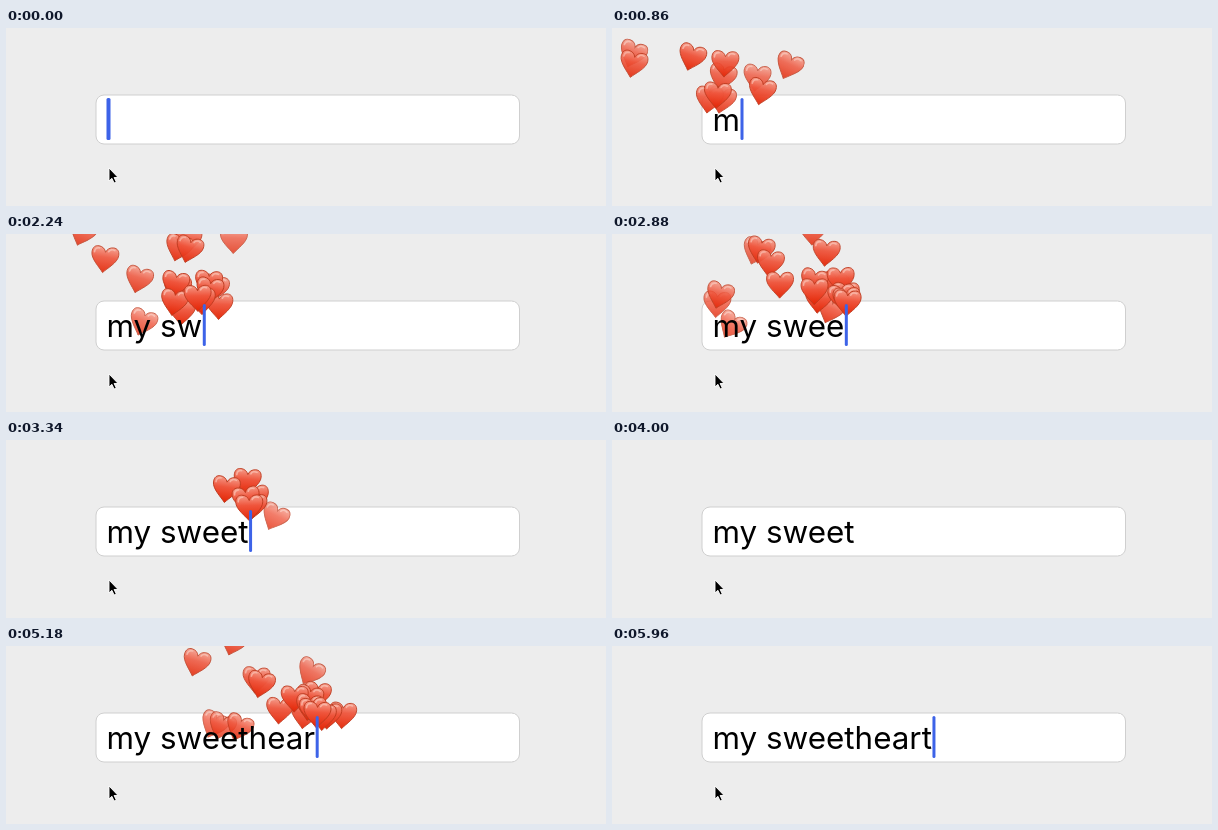
These frames come from a looping animation (600x178 px, 5980 ms). An HTML page:

```html
<!DOCTYPE html>
<html lang="en">
<head>
<meta charset="utf-8">
<title>Hearts while typing</title>
<style>
  html, body { margin: 0; width: 100%; height: 100%; overflow: hidden; background: #ededed; }
  svg { display: block; width: 600px; height: 178px; }
  text { font: 31.4px Inter, "Liberation Sans", sans-serif; white-space: pre; }
</style>
</head>
<body>
<svg viewBox="0 0 600 178">
  <defs>
    <linearGradient id="gloss" x1="0" y1="0" x2="0" y2="1">
      <stop offset="0" stop-color="#f69c8a"/>
      <stop offset=".4" stop-color="#ef553c"/>
      <stop offset="1" stop-color="#e32404"/>
    </linearGradient>
    <g id="heart">
      <path d="M0 13C-4 8-13.5 1-13.5-6C-13.5-11-11-13-7.5-13C-4-13-1-11 0-7.5C1-11 4-13 7.5-13C11-13 13.5-11 13.5-6C13.5 1 4 8 0 13Z"
            fill="url(#gloss)" stroke="#bd3a1e" stroke-width=".9"/>
      <path d="M-11-6.5C-11-10-9-11-6.5-11M3-8.5C4-11 6.5-11.5 9-10.5" fill="none"
            stroke="#fbc4b6" stroke-width="1.6" stroke-linecap="round" opacity=".7"/>
    </g>
  </defs>
  <rect width="600" height="178" fill="#ededed"/>
  <rect x="90" y="67" width="423.5" height="49" rx="8" fill="#fff" stroke="#cfcfcf"/>
  <g id="hearts"></g>
  <text id="typed" x="100.5" y="103" xml:space="preserve"></text>
  <rect id="caret" y="70" height="42" rx="1.5" fill="#3d63e8"/>
  <path d="M103 140V153L105.9 150.3L108.1 155L110.3 154L108.1 149.5H112.1Z"
        stroke="#fff" stroke-width=".9"/>
</svg>
<script>
const LOOP = 5980, STEP = 302, BLINK = 760;
const HEARTS_PER_KEY = 12, STREAM = 260, LIFE = 480;
const GRAVITY = 0.0003, ORIGIN_Y = 70;

// Letters typed at an even pace, with pauses between the runs
const RUNS = [
  { start: 400, text: "m" },
  { start: 1100, text: "y\u00a0swee" },
  { start: 3210, text: "t" },
  { start: 4010, text: "heart" }
];
const phrase = RUNS.map(run => run.text).join("");
const keyTimes = RUNS.flatMap(run => [...run.text].map((_, i) => run.start + i * STEP));

const byId = id => document.getElementById(id);
const typed = byId("typed"), caret = byId("caret"), layer = byId("hearts");

let seed = 71;
function random(min, max) {
  seed = (seed * 16807) % 2147483647;
  return min + (max - min) * seed / 2147483647;
}

// Caret position after the first n letters
function caretAt(n) {
  typed.textContent = phrase.slice(0, n);
  return 102.5 + (n ? typed.getComputedTextLength() : 0);
}
const caretX = Array.from({ length: phrase.length + 1 }, (_, n) => caretAt(n));

function makeHeart(birth, x) {
  const node = document.createElementNS("http://www.w3.org/2000/svg", "use");
  node.setAttribute("href", "#heart");
  layer.append(node);
  return {
    node, birth, x,
    vx: random(-0.38, 0.12),
    vy: random(-0.28, 0.03),
    tilt: random(-10, 8),
    spin: random(0.02, 0.07)
  };
}

const hearts = keyTimes.flatMap((time, key) =>
  Array.from({ length: HEARTS_PER_KEY }, (_, i) =>
    makeHeart(time + STREAM * i / (HEARTS_PER_KEY - 1), caretX[key + 1])));

function drawHeart(h, time) {
  const age = time - h.birth;
  const alive = age >= 0 && age < LIFE;
  h.node.setAttribute("display", alive ? "inline" : "none");
  if (!alive) return;
  const x = h.x + h.vx * age;
  const y = ORIGIN_Y + h.vy * age + GRAVITY * age * age / 2;
  const angle = h.tilt + h.spin * age;
  h.node.setAttribute("transform", `translate(${x} ${y}) rotate(${angle})`);
  h.node.setAttribute("opacity", 1 - 0.25 * (age / LIFE) ** 2);
}

function draw(time) {
  const letters = keyTimes.filter(t => t <= time).length;
  const lastKey = letters ? keyTimes[letters - 1] : 0;
  const text = phrase.slice(0, letters);
  if (typed.textContent !== text) typed.textContent = text;

  const width = letters ? 3 : 4;
  caret.setAttribute("x", caretX[letters] - width / 2);
  caret.setAttribute("width", width);
  caret.setAttribute("display", (time - lastKey) % (2 * BLINK) < BLINK ? "inline" : "none");
  for (const h of hearts) drawHeart(h, time);
}

const begin = performance.now();
function tick() {
  draw((performance.now() - begin) % LOOP);
  requestAnimationFrame(tick);
}
tick();
</script>
</body>
</html>
```
